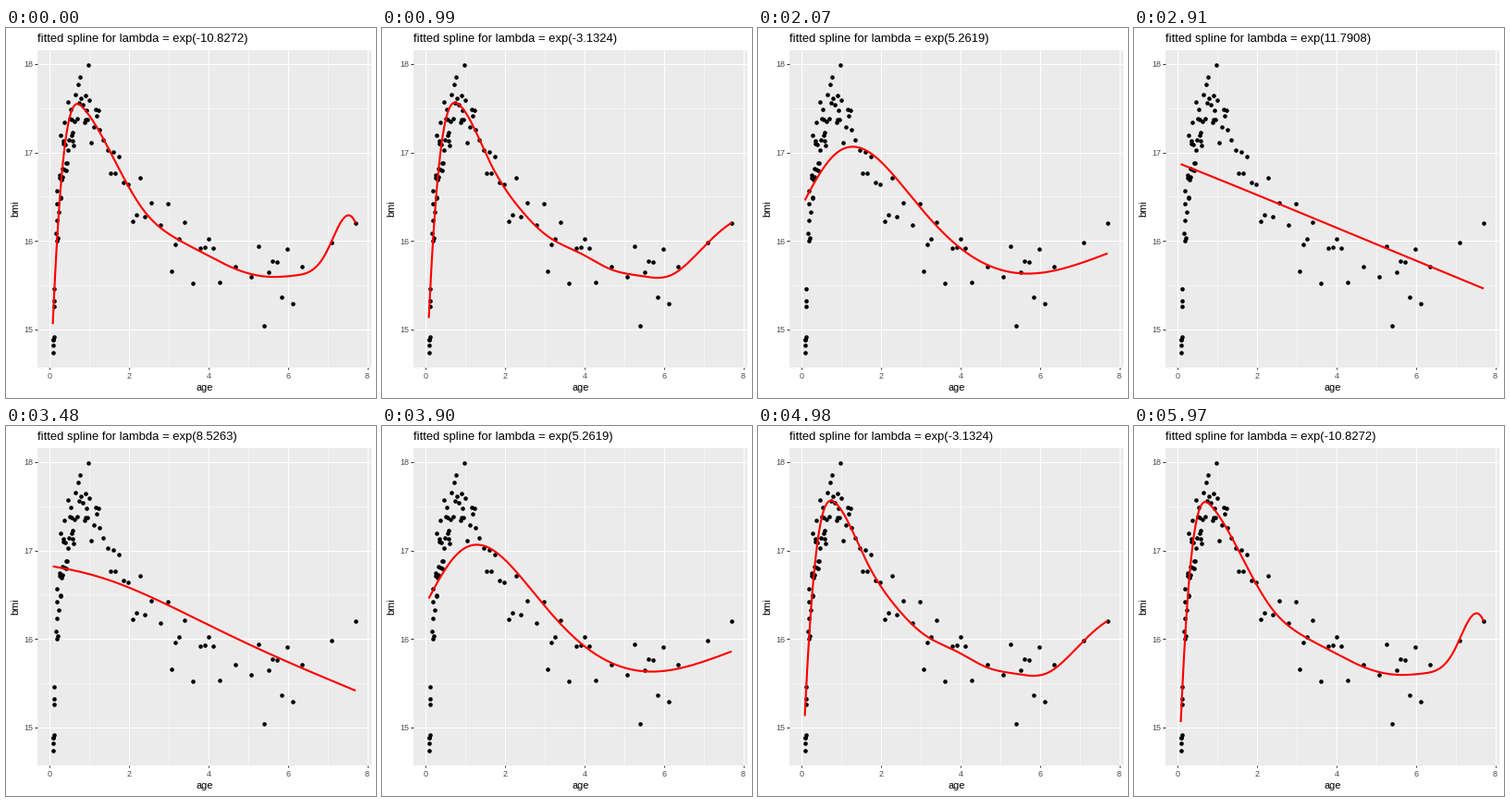
Write a matplotlib script that moves like this. It is 400x400 px and loops after 6000 ms.

```python
from math import comb

import matplotlib.pyplot as plt
import numpy as np
from matplotlib.animation import FuncAnimation
from matplotlib.patches import Rectangle

SIZE, DPI = 400, 100
PT = 72 / DPI                      # points per pixel
STEPS = 100                        # penalties swept one way
LOG_START, LOG_STEP = -10.8272, 0.233175
LEFT, TOP, RIGHT, BOTTOM = 34, 24, 394.5, 366.6
SEGMENTS = 10

plt.rcParams["font.family"] = "Liberation Sans"

# Observations as stage positions, grouped by age.
infants = [
    (51, 351), (51, 342.5), (50.6, 337), (51.2, 336.5), (51.5, 334),
    (51.5, 295), (52, 301), (52.3, 282), (53.5, 221.5), (54.5, 189.5),
    (54.8, 208), (55, 229.5), (55.3, 175.5), (55.8, 226.5), (56.5, 198.5),
    (57.5, 161.5), (58, 159), (58.5, 184), (59, 183), (59, 115.5),
    (60, 164), (60.5, 152), (61, 161), (62, 122), (62.3, 125),
    (62.5, 153), (63, 102), (63.5, 126), (64.5, 146), (65, 154),
    (65.5, 146), (66.5, 132), (67.3, 79.5), (68, 121), (68.5, 97.5),
]
toddlers = [
    (69.5, 88), (70.5, 99), (71, 115.5), (71.5, 122), (72, 113),
    (73, 126.5), (74, 101), (75, 71.5), (76.5, 98), (77.5, 61),
    (79, 81), (80, 52.5), (81, 76), (82.5, 83), (84.5, 101.5),
    (85.5, 99), (86, 73), (87, 88.5), (88, 98.5), (88.5, 39.5),
    (90, 78), (92, 123.5), (94.5, 107), (96.5, 87.5), (98, 94.5),
    (99.5, 88.5), (101, 109.5), (104.5, 121), (109.5, 131.5),
    (112.5, 156.5), (115.5, 133.5), (118, 156.5), (121.5, 139),
]
children = [
    (126.5, 166.5), (132, 168.5), (136.5, 209), (140.5, 202), (144.5, 161.5),
    (149.5, 203.5), (157, 188.5), (167, 212.5), (174.5, 189.5), (179, 263),
    (182.5, 234), (186.5, 228), (193, 209.5), (202, 275.5), (209.5, 238),
    (214.5, 237), (218.5, 227.5), (223.5, 237.5), (231, 274.5), (248, 257.5),
    (265, 268.5), (272.5, 236), (278.5, 322), (283.5, 264), (288, 252),
    (293, 253), (298, 290.5), (303.5, 238.5), (310, 298), (319.5, 258),
    (351.5, 231.5), (378, 211),
]
px, py = np.array(infants + toddlers + children).T


def age_x(age):
    return 47.4 + 42.9 * age


def bmi_y(bmi):
    return 39 + 95.65 * (18 - bmi)


# Penalised cubic B-spline on equally spaced knots
span = np.ptp(px)
knot_start = px.min() - 0.001 * span
knot_gap = 1.002 * span / SEGMENTS


def basis(x):
    u = (np.asarray(x) - knot_start) / knot_gap
    t = u[:, None] - np.arange(SEGMENTS + 3) + 3
    cubic = sum((-1) ** k * comb(4, k) * np.clip(t - k, 0, None) ** 3
                for k in range(5)) / 6
    return np.where((t > 0) & (t < 4), cubic, 0)


B = basis(px)
D = np.diff(np.eye(SEGMENTS + 3), 2, axis=0)
penalty = D.T @ D / 16             # scaled to unit norm
curve_x = np.linspace(px.min(), px.max(), 240)
curve_basis = basis(curve_x)


def fit(log_lam):
    coef = np.linalg.solve(B.T @ B + np.exp(log_lam) * penalty, B.T @ py)
    return curve_basis @ coef


fig = plt.figure(figsize=(SIZE / DPI, SIZE / DPI), dpi=DPI, facecolor="white")
ax = fig.add_axes([0, 0, 1, 1])
ax.set(xlim=(0, SIZE), ylim=(SIZE, 0))
ax.axis("off")


def rule(xs, ys, color, width, z):
    ax.plot(xs, ys, color=color, lw=width * PT, solid_capstyle="butt", zorder=z)


def label(x, y, text, size, color="black", **kw):
    return ax.text(x, y, text, fontsize=size * PT, color=color,
                   va="baseline", **kw)


ax.add_patch(Rectangle((LEFT, TOP), RIGHT - LEFT, BOTTOM - TOP,
                       fc="#EBEBEB", lw=0, zorder=0))
for age in range(1, 8, 2):
    rule([age_x(age)] * 2, [TOP, BOTTOM], "white", 0.53, 1)
for bmi in (15.5, 16.5, 17.5):
    rule([LEFT, RIGHT], [bmi_y(bmi)] * 2, "white", 0.53, 1)
for age in range(0, 9, 2):
    x = age_x(age)
    rule([x, x], [TOP, BOTTOM], "white", 1.07, 2)
    rule([x, x], [BOTTOM, BOTTOM + 2.75], "#333333", 1.07, 2)
    label(x, 379, str(age), 9, "#4D4D4D", ha="center")
for bmi in range(15, 19):
    y = bmi_y(bmi)
    rule([LEFT, RIGHT], [y, y], "white", 1.07, 2)
    rule([LEFT - 2.75, LEFT], [y, y], "#333333", 1.07, 2)
    label(29, y + 3.2, str(bmi), 9, "#4D4D4D", ha="right")

label((LEFT + RIGHT) / 2, 392, "age", 11, ha="center")
label(13, (TOP + BOTTOM) / 2, "bmi", 11, ha="center",
      rotation=90, rotation_mode="anchor")
title = label(LEFT, 15, "", 13, ha="left")

ax.scatter(px, py, s=(4.6 * PT) ** 2, c="black", linewidths=0, zorder=3)
curve, = ax.plot([], [], color="red", lw=2.13 * PT, solid_capstyle="butt",
                 solid_joinstyle="round", zorder=4)


def update(i):
    k = min(i, 2 * STEPS - 1 - i)
    log_lam = LOG_START + LOG_STEP * k
    curve.set_data(curve_x, fit(log_lam))
    title.set_text(f"fitted spline for lambda = exp({round(log_lam, 4)})")
    return curve, title


anim = FuncAnimation(fig, update, frames=2 * STEPS, interval=30,
                     repeat=True, repeat_delay=0)
plt.show()
```
